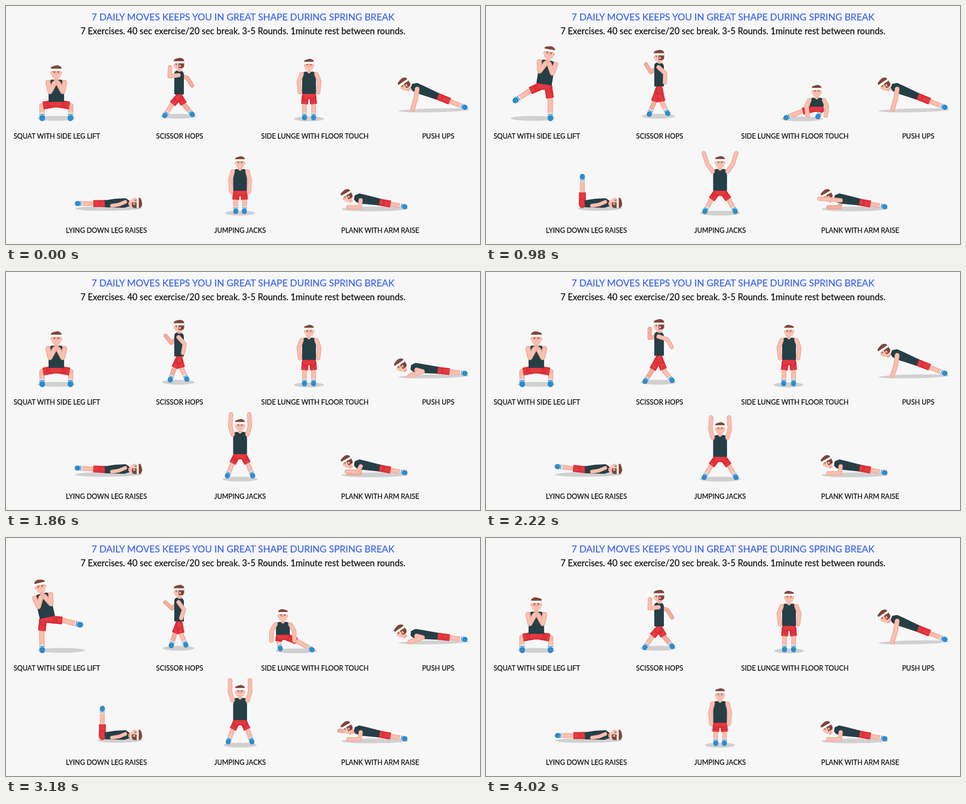
An HTML page with a canvas that plays this animation: 890 px wide and 447 px high, repeating every 4060 ms.

```html
<!DOCTYPE html>
<html lang="en">
<head>
<meta charset="utf-8">
<title>7 daily moves</title>
<style>
  html, body { margin: 0; width: 100%; height: 100%; overflow: hidden; background: #f7f7f7; }
  canvas, svg { position: absolute; left: 0; top: 0; width: 890px; height: 447px; }
  text { font: 12.7px Lato, sans-serif; fill: #111; stroke: #111; stroke-width: 0.25px; text-anchor: middle; }
  .title { font-size: 17.6px; fill: #3c64f4; stroke: #3c64f4; }
  .intro { font-size: 16.4px; }
</style>
</head>
<body>
<canvas width="890" height="447"></canvas>
<svg viewBox="0 0 890 447">
  <text class="title" x="445" y="27">7 DAILY MOVES KEEPS YOU IN GREAT SHAPE DURING SPRING BREAK</text>
  <text class="intro" x="445" y="53">7 Exercises. 40 sec exercise/20 sec break. 3-5 Rounds. 1minute rest between rounds.</text>
  <text x="95.5" y="249">SQUAT WITH SIDE LEG LIFT</text>
  <text x="326" y="249">SCISSOR HOPS</text>
  <text x="580" y="249">SIDE LUNGE WITH FLOOR TOUCH</text>
  <text x="811.5" y="249">PUSH UPS</text>
  <text x="188.5" y="426">LYING DOWN LEG RAISES</text>
  <text x="439.5" y="426">JUMPING JACKS</text>
  <text x="702.5" y="426">PLANK WITH ARM RAISE</text>
</svg>
<script>
const ctx = document.querySelector('canvas').getContext('2d');
const SKIN = ['#f4ae9d', '#f9c0b1'], FAR_SKIN = ['#eda391', '#f2b09f'];
const SHORTS = ['#d92e37', '#e43a42'];
const SHIRT = '#263f47', HAIR = '#7d463a', BLUE = '#2f8ccb', SHADOW = '#d0d0d0';
const RAD = Math.PI / 180;

// ---- motion and geometry
const mix = (a, b, k) => Array.isArray(a) ? a.map((v, i) => mix(v, b[i], k)) : a + (b - a) * k;

function ramp(t, from, to) {
  const x = Math.min(1, Math.max(0, (t - from) / (to - from)));
  return x * x * (3 - 2 * x);
}

// Rises from 0 to 1 between the first two times and falls back between the last two.
const pulse = (t, rise, top, fall, end) => ramp(t, rise, top) - ramp(t, fall, end);

const polar = ([x, y], length, angle) => [x + length * Math.sin(angle), y + length * Math.cos(angle)];
const pair = (x, y) => [[-x, y], [x, y]];

// Elbow or knee: a point between two ends, pushed sideways by bend.
function joint(a, b, bend) {
  const dx = b[0] - a[0], dy = b[1] - a[1], length = Math.hypot(dx, dy) || 1;
  return [a[0] + dx * 0.42 + dy / length * bend, a[1] + dy * 0.42 - dx / length * bend];
}

// ---- drawing helpers
function stroke(points, width, color, cap = 'round') {
  ctx.beginPath();
  points.forEach(p => ctx.lineTo(...p));
  ctx.lineWidth = width;
  ctx.strokeStyle = color;
  ctx.lineCap = cap;
  ctx.lineJoin = 'round';
  ctx.stroke();
}

function limb(points, width, [edge, core], cap) {
  stroke(points, width, edge, cap);
  stroke(points, width * 0.6, core, cap);
}

function box(x, y, w, h, r, color) {
  ctx.fillStyle = color;
  ctx.beginPath();
  ctx.roundRect(x, y, w, h, r);
  ctx.fill();
}

function blob(points, color) {
  ctx.fillStyle = color;
  ctx.beginPath();
  points.forEach(p => ctx.lineTo(...p));
  ctx.closePath();
  ctx.fill();
}

function shadow(x0, x1, y, ry = 4.5, tilt = 0) {
  ctx.fillStyle = SHADOW;
  ctx.beginPath();
  ctx.ellipse((x0 + x1) / 2, y, (x1 - x0) / 2, ry, tilt, 0, 7);
  ctx.fill();
}

function within([x, y], angle, s, draw) {
  ctx.save();
  ctx.translate(x, y);
  ctx.rotate(angle);
  ctx.scale(s, s);
  draw();
  ctx.restore();
}

function leg(hip, knee, foot, s = 1, skin = SKIN) {
  const length = Math.hypot(foot[0] - knee[0], foot[1] - knee[1]) || 1;
  const shin = d => mix(foot, knee, d * s / length);
  limb([hip, knee, foot], 9 * s, skin);
  limb([hip, mix(hip, knee, 0.88)], 13 * s, SHORTS, 'butt');
  limb([hip, mix(hip, knee, 0.2)], 13 * s, SHORTS);
  stroke([shin(9), foot], 9.5 * s, '#fff', 'butt');
  for (const d of [7.5, 4.5]) stroke([shin(d), shin(d - 1.4)], 9.5 * s, BLUE, 'butt');
  stroke([shin(1), foot], 9.5 * s, BLUE);
}

function hairTop() {
  blob([[-10, -5], [-10, -10], [-5, -12], [2, -13.5], [7, -12], [10, -9], [9.5, -5]], HAIR);
}

function frontHead() {
  box(-4, 7, 8, 8, 2, SKIN[0]);
  box(-11, -2, 22, 6, 3, SKIN[0]);
  box(-9, -8, 18, 20, [3, 3, 7, 7], SKIN[1]);
  hairTop();
  box(-10, -7, 20, 4, 1, '#fff');
  for (const x of [-6, 1.5]) {
    box(x, -1.5, 4.5, 1.3, 0, HAIR);
    box(x + 1.5, 0.5, 1.5, 1.5, 1, '#333');
  }
  box(-1.5, 0, 3, 5, 1.5, SKIN[0]);
}

function sideHead() {
  box(-3, 6, 8, 8, 2, SKIN[0]);
  box(-10.5, -1, 4, 5, 2, SKIN[0]);
  box(-9, -8, 17, 18, [3, 3, 5, 6], SKIN[1]);
  box(-1, -6, 11, 13, [0, 2, 5, 1], HAIR);
  hairTop();
  box(-10, -6.5, 20, 4, 1, '#fff');
  box(-7.5, -2, 4, 1.3, 0, HAIR);
  box(-6, 0, 1.5, 1.5, 1, '#333');
  box(0, 0, 3.5, 5, 2, SKIN[0]);
}

// ---- figures seen from the front; hands are placed relative to the neck
function frontFigure(centre, groundY, s, side, { neck, pelvis, hands, feet, armBend, kneeBend }) {
  const angle = Math.atan2(neck[0] - pelvis[0], pelvis[1] - neck[1]);
  const length = Math.hypot(neck[0] - pelvis[0], pelvis[1] - neck[1]) / s;
  const [left, right] = feet.map(foot => foot[0]);
  const pad = Math.max(9, (56 - right + left) / 2);

  ctx.save();
  ctx.translate(centre, 0);
  ctx.scale(side, 1);
  shadow(left - pad, right + pad, groundY);

  const hips = [-7, 7].map(x => [pelvis[0] + x * s, pelvis[1] + 5]);
  hips.forEach((hip, i) => leg(hip, joint(hip, feet[i], i ? kneeBend : -kneeBend), feet[i], s));
  limb(hips, 12 * s, SHORTS);

  within(neck, angle, s, () => {
    stroke(pair(10, 5), 9, SKIN[1]);
    blob([[-5, 0], [-9.5, 1], [-13, 11], [-13, length + 1],
      [13, length + 1], [13, 11], [9.5, 1], [5, 0], [0, 4]], SHIRT);
    pair(14, 5).forEach((shoulder, i) =>
      limb([shoulder, joint(shoulder, hands[i], i ? armBend : -armBend), hands[i]], 8.5, SKIN));
    within([0, -12], 0, 0.88, frontHead);
  });
  ctx.restore();
}

function squat(t, side) {
  const rise = pulse(t, 0.21, 0.3, 0.7, 0.9);
  const lift = pulse(t, 0.32, 0.54, 0.6, 0.74);
  frontFigure(94.5, 211, 1.12, side, {
    neck: [10 * rise + 17 * lift, 138 - 42 * rise + 8 * lift],
    pelvis: [9 * rise + 8 * lift, 179 - 38 * rise + 7 * lift],
    hands: pair(3, 6),
    feet: [[-26.5 - 18.5 * lift, 211 - 48 * lift], [26.5, 211]],
    armBend: 15,
    kneeBend: 14 - 12 * rise
  });
}

function sideLunge(t, side) {
  const shift = pulse(t, 0.1, 0.28, 0.52, 0.8);
  const step = pulse(t, 0.06, 0.24, 0.56, 0.82);
  const depth = pulse(t, 0.15, 0.28, 0.48, 0.7);
  const neck = [52 * shift, 123 + 49 * depth];
  frontFigure(569, 212, 1, side, {
    neck,
    pelvis: [neck[0], neck[1] + 41 - 25 * depth],
    hands: pair(17 + 6 * Math.sin(Math.PI * depth), 39 - 5 * depth),
    feet: [[-8.5 + 2.5 * step, 210], [8.5 + 45.5 * step, 210 - 2 * step]],
    armBend: 4,
    kneeBend: 1 + depth
  });
}

function jumpingJacks(t) {
  const open = pulse(t, 0.22, 0.42, 0.66, 0.86);
  const hop = pulse(t, 0.16, 0.28, 0.36, 0.46) + pulse(t, 0.68, 0.76, 0.8, 0.92);
  const raise = (4 + 172 * pulse(t, 0.1, 0.36, 0.63, 0.9)) * RAD;
  frontFigure(439.5, 389, 1, 1, {
    neck: [0, 306 - 6 * hop],
    pelvis: [0, 346 - 5 * hop],
    hands: [-1, 1].map(x => polar([14 * x, 5], 38, raise * x)),
    feet: pair(8 + 22 * open, 386 - 3 * hop),
    armBend: 3 * Math.cos(raise),
    kneeBend: 1
  });
}

// ---- scissor hops: swing is 1 when a limb is forward, -1 when it is back
function scissorHops(hops) {
  const t = hops % 1;
  const swing = (1 - 2 * ramp(t, 0.2, 0.9)) * (Math.floor(hops) % 2 ? -1 : 1);
  const reach = Math.abs(swing);

  const arm = (m, skin) => {
    const upper = -(5 + 78 * m) * RAD, fore = upper - (70 + 30 * m) * RAD;
    const elbow = polar([324, 130], 17, upper);
    limb([[324, 130], elbow, polar(elbow, 17, fore)], 8, skin);
  };
  const scissorLeg = (m, lift, skin) => leg([325, 170 + lift], [323 - 12 * m, 176 + 10 * reach],
    [324 - 26 * m, 198 + 7 * reach + m], 1, skin);

  const lift = -15 * pulse(t, 0.1, 0.35, 0.58, 0.82);
  const raised = draw => within([0, lift], 0, 1, draw);
  shadow(299 - 9 * reach, 350 + 7 * reach, 207);
  raised(() => arm(-swing, FAR_SKIN));
  scissorLeg(-swing, lift, FAR_SKIN);
  scissorLeg(swing, lift, SKIN);
  raised(() => {
    box(316, 121, 18, 45, [6, 8, 0, 0], SHIRT);
    arm(swing, SKIN);
    within([325, 110], 0, 0.95, sideHead);
  });
}

// ---- figures close to the floor: the body is one line from shoulder to foot
function proneBody(shoulder, foot) {
  const hip = mix(shoulder, foot, 0.46), knee = mix(shoulder, foot, 0.74);
  leg(hip, knee, foot);
  const length = Math.hypot(hip[0] - shoulder[0], hip[1] - shoulder[1]);
  within(shoulder, Math.atan2(hip[1] - shoulder[1], hip[0] - shoulder[0]), 1, () =>
    blob([[-3, -4], [5, -9], [18, -8.5], [length + 2, -6.5],
      [length + 2, 6.5], [14, 9], [2, 8], [-3, 4]], SHIRT));
}

function pushUps(t) {
  const down = pulse(t, 0.04, 0.28, 0.4, 0.64);
  const [x, y] = mix([764, 151], [763, 179], down);
  shadow(737, 870, 196, 3.5, -0.02);
  proneBody([x, y], [862, 190.5]);
  limb([[x + 8, y + 5], mix([769, 175], [782, 187], down), mix([763, 195], [758, 195], down)], 9, SKIN);
  within([x - 15 - 6 * down, y - 3], -0.6, 1, sideHead);
}

function legRaises(t) {
  const angle = 90 * pulse(t, 0.03, 0.34, 0.58, 0.94) * RAD;
  const hip = [187 - 6 * Math.sin(angle), 371 + 2 * Math.sin(angle)];
  const along = d => polar(hip, -d, Math.PI / 2 - angle);
  shadow(172 - 42 * Math.cos(angle), 256, 380, 4.5, -0.01);
  leg(hip, along(26), along(53));
  blob([[185, 365], [205, 362], [225, 361], [232, 366], [232, 376], [222, 379], [186, 378]], SHIRT);
  limb([[224, 368], [212, 373], [199, 375]], 7, SKIN);
  within([243, 370], Math.PI / 2, 0.95, sideHead);
}

function plank(t, nearArm) {
  const rest = [[664, 378], [643, 378]];
  const moving = mix(rest, [[646, 363], [626, 362]], pulse(t, 0.18, 0.38, 0.7, 0.98));
  const arm = (points, skin) => limb([[666, 365], ...points], 8, skin);
  shadow(630, 756, 381, 4.5, -0.01);
  arm(nearArm ? rest : moving, FAR_SKIN);
  proneBody([657, 360], [749, 377]);
  if (!nearArm) arm(rest, SKIN);
  within([641, 357], -0.5, 0.95, sideHead);
  if (nearArm) arm(moving, SKIN);
}

function render(ms) {
  // The picture advances in 40 ms steps after holding the first pose.
  const loop = Math.max(0, Math.floor((ms % 4060 - 60) / 40)) / 100;
  const firstHalf = loop < 0.5, half = loop * 2 % 1, third = loop * 3 % 1;
  const side = firstHalf ? 1 : -1;
  ctx.fillStyle = '#f7f7f7';
  ctx.fillRect(0, 0, 890, 447);
  squat(half, side);
  scissorHops(loop * 6);
  sideLunge(half, side);
  pushUps(third);
  legRaises(half);
  jumpingJacks(third);
  plank(half, firstHalf);
}

const start = performance.now();
(function tick() {
  render(performance.now() - start);
  requestAnimationFrame(tick);
})();
</script>
</body>
</html>
```
